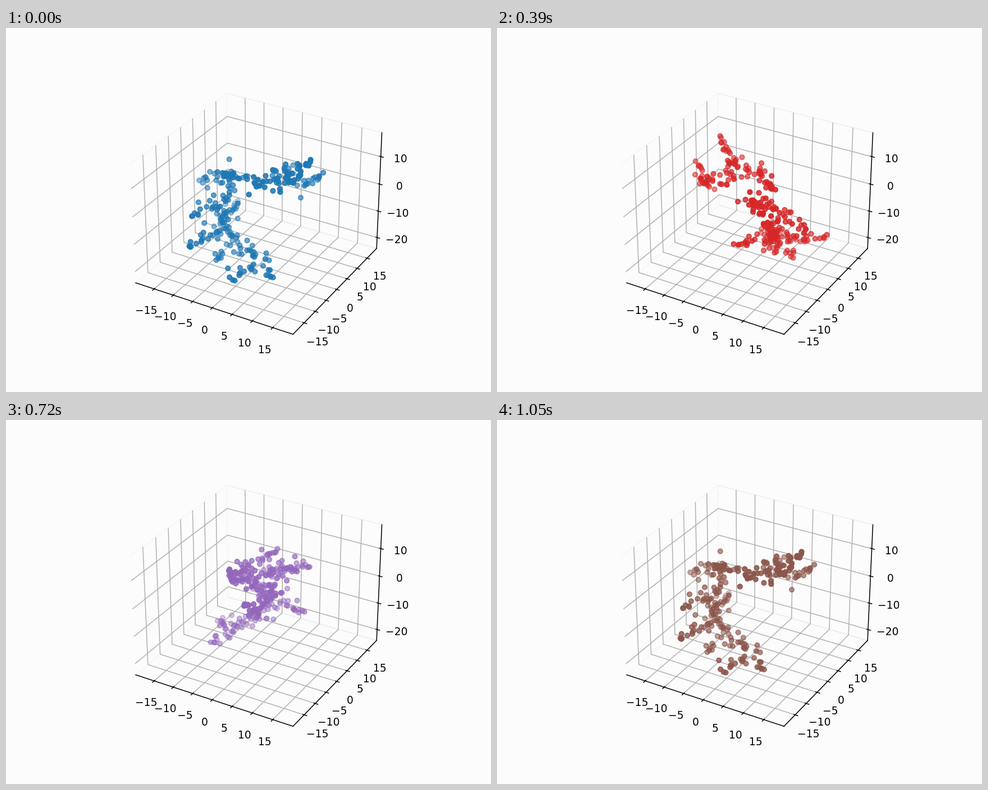
Write a matplotlib script that moves like this. It is 864 px wide and 648 px high and loops after 1080 ms.

```python
import numpy as np
import matplotlib.pyplot as plt
from matplotlib.animation import ArtistAnimation

FRAMES, LOOP_MS = 36, 1080
DENSITY = 1.8  # atoms per unit of chain length
BG = "#fcfcfc"

# Joints of a branched chain molecule: right, back, up
JOINTS = np.array([
    (4, 1, 7), (11, -2, 15.5), (7, 6, 7), (10, 3, 2), (14, 3, 7), (8, -3, 9),
    (0, -4, 8), (-8, 1, 9), (-6, 6, 5), (-7, -1, 1), (-13, 7, 2),
    (-8, 0, -8), (-5, 9, -8), (-5, -2, -12), (-15, -9, -9.5),
    (-14.5, -3, -3), (-9.5, -4.5, -18), (-1, -6, -15),
    (-5.5, -12.5, -18.5), (3, -10, -20),
])


def grow(joints, rng):
    """Link each joint to its nearest predecessor, thinning out to its tip."""
    atoms = [joints[:1]]
    for i in range(1, len(joints)):
        gaps = np.linalg.norm(joints[:i] - joints[i], axis=1)
        start, count = joints[np.argmin(gaps)], round(DENSITY * gaps.min())
        t = np.linspace(0, 1, count + 1)[1:, None]
        spread = 1.8 - 1.5 * t
        atoms.append(start + t * (joints[i] - start)
                     + spread * rng.normal(size=(count, 3)))
    return np.vstack(atoms)


def spin(atoms, angle):
    """Turn the atoms about the vertical axis."""
    c, s = np.cos(angle), np.sin(angle)
    u, v, z = atoms.T
    return c * u - s * v, s * u + c * v, z


atoms = grow(JOINTS, np.random.default_rng(4))

fig = plt.figure(figsize=(6.4, 4.8), dpi=135, facecolor=BG)
ax = fig.add_subplot(projection="3d", facecolor=BG)
ax.view_init(elev=30, azim=-60)

# The last pose closes the turn; colours step through the default cycle
frames = [
    [ax.scatter(*spin(atoms, np.pi / 6 + turn), color=f"C{i % 10}")]
    for i, turn in enumerate(np.linspace(0, 2 * np.pi, FRAMES))
]

ax.set(xlim=(-19.9, 19.9), ylim=(-19.9, 19.9), zlim=(-24.18, 18.52),
       xticks=range(-15, 16, 5), yticks=range(-15, 16, 5),
       zticks=range(-20, 11, 10))
for axis in (ax.xaxis, ax.yaxis, ax.zaxis):
    axis.pane.set_fill(False)

anim = ArtistAnimation(fig, frames, interval=LOOP_MS // FRAMES,
                       repeat=True, repeat_delay=0)
plt.show()
```
